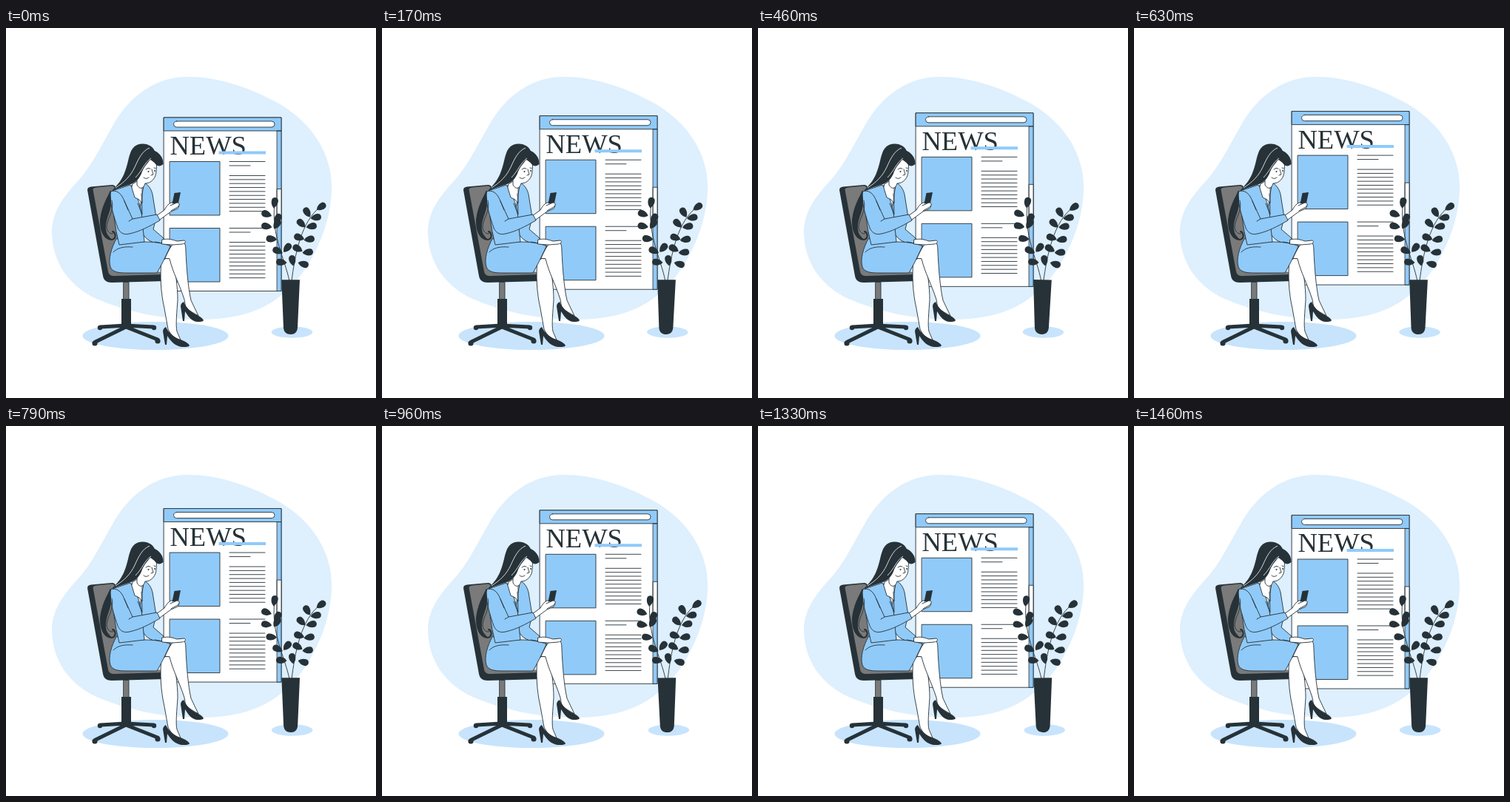
These frames come from a looping animation (500x500 px, 1500 ms). An HTML page:

```html
<!DOCTYPE html>
<html lang="en">
<head>
<meta charset="utf-8">
<style>
  html, body { margin: 0; width: 100%; height: 100%; overflow: hidden; background: #fff; }
  svg { display: block; width: 100%; height: 100%; }
  .line { stroke: #263238; stroke-width: .9; fill: none; stroke-linejoin: round; stroke-linecap: round; }
  .white { fill: #fff; }
  .blue { fill: #90caf9; }
  .dark { fill: #263238; }
  .grey { fill: #7a7a7a; }
  .pale { fill: #c7e4fc; }
  .thick { stroke: #263238; fill: none; stroke-linecap: round; stroke-linejoin: round; }
  .strand { stroke: #fff; stroke-width: .8; fill: none; }
</style>
</head>
<body>
<svg viewBox="0 0 500 500">
  <path fill="#deeffd" d="M246 66C203 66 169 90 146 129C127 162 115 188 96 208C76 230 62 250 62 276C63 317 84 346 118 364C160 383 211 394 262 394C310 394 345 383 371 362C400 340 418 306 429 276C438 250 442 225 439 199C433 157 405 122 365 100C325 79 286 66 246 66Z"/>
  <ellipse class="pale" cx="202" cy="416" rx="98.5" ry="19"/>

  <g id="page">
    <path class="line white" d="M213.5 121H372V355.5H213.5Z"/>
    <path class="line blue" d="M213.5 121H372V139H213.5ZM366.5 139H372V355.5H366.5Z"/>
    <path class="line white" d="M366.5 217.5H372V264H366.5Z"/>
    <rect class="line white" x="226.5" y="126" width="136.5" height="8" rx="4"/>
    <text class="dark" x="221.5" y="171" font-size="36.5" font-family="'Liberation Serif', serif">NEWS</text>
    <path class="blue" d="M287.5 166.5H351V170.5H287.5Z"/>
    <path class="line blue" d="M221.5 180.5H289V253H221.5ZM221.5 270.5H289V343H221.5Z"/>
    <path class="line" id="copy"/>
  </g>

  <g id="plant">
    <ellipse class="pale" cx="386.5" cy="411" rx="27.8" ry="7.7"/>
    <path class="line" d="M383 342C377 312 358 280 363 238M386 342C390 310 398 260 426 241"/>
    <g id="leaves" class="dark"></g>
    <path class="dark" d="M372.3 340.3H397L394 405C393.5 411 390 414 385 414C379 414 375.5 411 375 405Z"/>
  </g>

  <!-- chair -->
  <path class="dark" d="M110 219C110 216 112 215 115 214.500L143 212C147 212 148 214 149 218L170 328L214 332V342L143 344C136 344 132 341 131 335Z"/>
  <path class="grey" d="M118 221C117 217 118 216 122 215.500L142 213.500C146 213.500 147 215 148 219L170 326L212 330V333L147 335C141 335 139 333 138 329Z"/>
  <path class="line grey" d="M159 343.500H166V368H159Z"/>
  <path class="dark" d="M156 366H169V404H156Z"/>
  <path class="thick" stroke-width="5" d="M128 404L162 402L199 404M121 424L162 404L205 421"/>
  <g class="dark">
    <circle cx="127" cy="405" r="3.200"/><circle cx="200" cy="405" r="3.200"/>
    <circle cx="120" cy="426" r="3.600"/><circle cx="205" cy="423" r="3.600"/>
  </g>

  <!-- legs -->
  <path class="line white" d="M210 312C208 335 209 357 214 379L219 407C223 415 228 420 237 424L231 410C229 402 231 383 232 367C232 350 229 330 226 312Z"/>
  <path class="line white" d="M213 311C220 297 228 287 237 288C242 289 243 294 243 302C244 325 246 350 250 368L260 389L243 379L241 367C234 345 226 332 221 312Z"/>
  <path class="dark" d="M240 370C243 377 249 383 256 387C259 388 265 391 267 395C266 397 262 397 258 397C251 396 247 391 242 383L241 396H239L236 376C236 373 238 371 240 370Z"/>
  <path class="dark" d="M216 404C219 411 226 417 233 420C239 422 246 425 248 429C247 431 243 431 238 431C229 430 223 424 218 416L217 428H215L212 410C212 407 214 405 216 404Z"/>

  <!-- body -->
  <path class="line white" d="M168 214L182 208L187 220L185 268H174Z"/>
  <path class="line blue" d="M187 209C194 213 198 220 199 231L203 256L199 272L213 284L211 292C200 291 189 288 184 276L180 250Z"/>
  <path class="line blue" d="M149 285C142 298 138 312 141 323C144 330 152 331 163 331H204C211 319 216 307 223 295C211 290 199 289 187 289Z"/>
  <path class="line" d="M145 303C150 297 160 295 171 296M214 313L222 295M201 289L218 292"/>
  <path class="line white" d="M211 286C219 284 225 286 231 288L241 287C244 289 242 291 238 292L225 293L211 292Z"/>
  <path class="line blue" d="M141 221L168 212C177 224 184 243 185 270L187 289L153 293L149 275Z"/>
  <path class="line white" d="M171 211L180 205L184 212L184 237L180 232L174 229L170 216Z"/>
  <path class="line" d="M183 224L184 251M178 237L184 252"/>
  <path class="line white" d="M203 254L214 246C216 242 219 238 223 236L231 235C234 237 235 240 232 244L223 248L208 259Z"/>
  <path class="dark" d="M227.500 223L236 222L233 236.500L224.500 237.500Z"/>
  <path class="line white" d="M222 240L231 236C235 236 235 239 232 242L223 247"/>
  <path class="line blue" d="M141 221C149 218 156 223 160 234L171 258L204 252L208 260C194 268 181 275 167 278C159 280 154 277 151 270C146 255 140 238 141 221Z"/>
  <path class="line" d="M171 258L166 261M160 234L165 246"/>

  <!-- head -->
  <path class="line white" d="M177 188L177 212C181 219 186 217 188 210C196 210 203 203 203 193L204 178L190 169Z"/>
  <path class="dark" d="M168 169C171 160 178 156 185 156.500C193 157 198 160 201 166C208 169 213 176 212.500 184C209 187 206 187 203 185C200 181 197 179 195 178C191 183 187 187 184 194C181 203 176 208 169 211C159 214 151 217 143 220C152 211 157 204 160 196C164 187 165 177 168 169Z"/>
  <path class="strand" d="M194 162C184 166 179 177 174 188C168 201 159 209 148 216M196 176C187 182 184 193 175 202"/>
  <path class="line" d="M189 191Q192 188 195 190M200 189L202 189.500M197 191L199 198L196 199M186 202Q189 205 193 202"/>
  <circle class="dark" cx="192.500" cy="194" r="1"/><circle class="dark" cx="201" cy="193" r=".9"/>
  <path class="thick" stroke-width="2" d="M141 222C136 234 128 248 128 262C128 276 134 286 143 286C149 285 149 277 144 275"/>
  <path class="dark" d="M141 221C133 234 126 250 128 266C130 280 136 287 144 286C138 282 134 276 135 267C136 254 143 246 142 233Z"/>
  <path class="line" d="M143 233C147 248 136 257 136 270C137 278 146 281 146 275"/>
</svg>
<script>
const LOOP = 1500;
const $ = id => document.getElementById(id);

// Article text: a heading of two rules and a paragraph of ten
let rules = '';
const rule = (y, width) => rules += `M302 ${y}h${width}`;
for (const top of [180.5, 270.5]) {
  rule(top, 48);
  rule(top + 5.5, 28);
  for (let i = 0; i < 10; i++) rule(top + 19 + i * 5.35, 48);
}
$('copy').setAttribute('d', rules);

// Leaf centre x, y and direction of its round end in degrees
const leaves = [
  [363, 236, -80], [352, 251.5, 200], [367, 257.5, -60], [352, 268, 190],
  [358.5, 285, 185], [366, 265, -60], [380, 297, -50], [372, 316.5, 185],
  [367, 301, 205], [387, 314, -100],
  [426, 241.5, -35], [407, 249, 240], [399, 264, 225], [419, 256, -10],
  [413, 268, -10], [396, 283, 200], [410, 285.5, -10], [394, 298, 210],
  [408, 303, -5], [402, 319, 15]
];
$('leaves').innerHTML = leaves.map(([x, y, turn]) =>
  `<path transform="translate(${x} ${y}) rotate(${turn})" d="M-7.5 0C-4 -4 0 -5 4 -4.3C8 -3 8 3 4 4.300C0 5 -4 4 -7.500 0Z"/>`
).join('');

function draw(now) {
  const p = now % LOOP / LOOP;
  const lift = 10 * (1 - Math.abs(1 - 2 * p));
  const sway = Math.asin(Math.sin(2 * Math.PI * p)) * 2 / Math.PI;
  $('page').setAttribute('transform', `translate(0 ${-lift})`);
  $('plant').setAttribute('transform', `rotate(${sway} 389 324)`);
  requestAnimationFrame(draw);
}
draw(performance.now());
</script>
</body>
</html>
```
